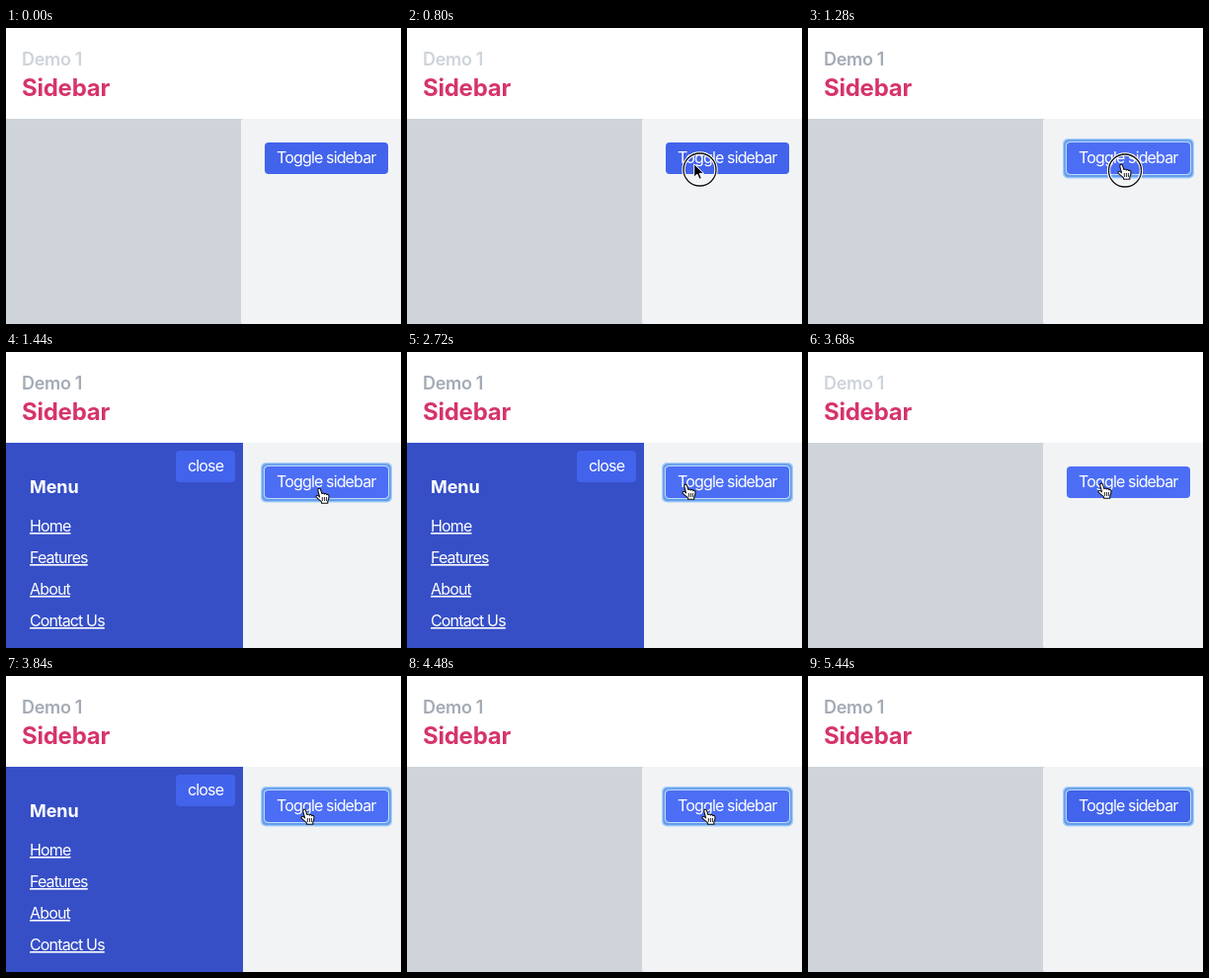
These frames come from a looping animation (400 by 300 pixels, 6080 ms). An HTML page:

```html
<!DOCTYPE html>
<html lang="en">
<head>
<meta charset="utf-8">
<title>Sidebar demo</title>
<style>
  html, body { margin: 0; width: 100%; height: 100%; overflow: hidden; background: #fff; }
  svg { display: block; width: 400px; height: 300px; }
  text { font-family: Inter, "Open Sans", sans-serif; font-size: 16px; letter-spacing: -.85px; fill: #fff; }
  .link { text-decoration: underline; }
  #eyebrow { font-size: 18px; font-weight: 600; letter-spacing: -.3px; }
  .title { font-size: 24px; font-weight: 700; letter-spacing: -.25px; fill: #d6336c; }
  .menu { font-size: 18px; font-weight: 700; letter-spacing: -.1px; }
</style>
</head>
<body>
<svg viewBox="0 0 400 300">
  <rect width="400" height="300" fill="#fff"/>
  <text id="eyebrow" x="16" y="38">Demo 1</text>
  <text class="title" x="16" y="69">Sidebar</text>

  <rect y="92" width="400" height="208" fill="#ced4da"/>
  <rect x="238" y="92" width="170" height="208" rx="2" fill="#f1f3f5"/>

  <g id="sidebar">
    <rect y="92" width="240" height="208" fill="#364fc7"/>
    <rect id="closeRing" x="168.5" y="96.5" width="67" height="39" rx="6" fill="#2a5fcb"/>
    <rect id="closeButton" x="172" y="100" width="60" height="32" rx="4"/>
    <text x="184" y="121">close</text>
    <text class="menu" x="24" y="143">Menu</text>
    <text class="link" x="24" y="182">Home</text>
    <text class="link" x="24" y="214">Features</text>
    <text class="link" x="24" y="246">About</text>
    <text class="link" x="24" y="278">Contact Us</text>
  </g>

  <g id="toggleRing">
    <rect x="258" y="112" width="133" height="40.5" rx="5" fill="#a9cdf5"/>
    <rect x="259.2" y="113.2" width="130.6" height="38" rx="4.5" fill="#629eee"/>
    <rect x="261" y="115" width="127" height="34" rx="4.5" fill="#c3d9f8"/>
  </g>
  <rect id="toggleButton" x="262" y="116" width="125" height="32" rx="4"/>
  <text x="274" y="137">Toggle sidebar</text>

  <g id="click" fill="none">
    <circle r="16.5" stroke="#fff" stroke-width="3.4"/>
    <circle r="16.5" stroke="#111" stroke-width="1.3"/>
  </g>
  <g id="arrow" stroke-linejoin="round">
    <path d="M.7 .8V14.2L3.9 11.2 6.1 16.3 8.4 15.3 6.2 10.4H10.6Z" fill="#000" stroke="#fff"/>
  </g>
  <g id="hand" stroke="#111" stroke-width="1.1" stroke-linejoin="round" stroke-linecap="round">
    <path fill="#fff" d="M4.6 9.8L2.9 3.6C2.4 1.2 4.7 .1 5.5 2.4L6.9 6.6C7.6 5.6 9 5.8 9.3 7C10.2 6.2 11.4 6.5 11.7 7.6C13 7 14 7.8 14 9.2C14 12 13.3 13 12.8 14V16.3H6.6V15C5.3 13.6 3.4 12.2 1.4 10.4C.2 9 2 7.8 3.2 8.6Z"/>
    <path fill="none" stroke-width=".9" d="M7.3 10.4V13.6M9.4 10.4V13.6M11.4 10.4V13.6"/>
  </g>
</svg>
<script>
  const LOOP = 6080;
  const BASE = '#4263eb', FADING = '#4869f0', HOVER = '#4c6ef5';
  const $ = id => document.getElementById(id);

  // Pointer stops: start time, shape, left, top
  const pointer = [
    [0, ''],
    [320, 'arrow', 355, 171],
    [480, 'arrow', 290, 145],
    [640, 'arrow', 290, 137],
    [1120, 'hand', 313, 137],
    [2720, 'hand', 278, 133],
    [2880, 'hand', 213, 122],
    [3040, 'hand', 201, 121],
    [3360, 'arrow', 205, 120],
    [3520, 'arrow', 255, 130],
    [3680, 'hand', 293, 132],
    [3840, 'hand', 298, 134],
    [5280, 'arrow', 350, 162],
    [5440, '']
  ];

  // Clicks: start, end, centre
  const clicks = [
    [800, 960, 296.5, 143.5],
    [1280, 1440, 321, 144.5],
    [3200, 3360, 208.5, 129]
  ];

  const within = (t, ...spans) => spans.some(([from, to]) => t >= from && t < to);
  const show = (id, on) => $(id).setAttribute('visibility', on ? 'visible' : 'hidden');
  const fill = (id, color) => $(id).setAttribute('fill', color);
  const move = (id, x, y) => $(id).setAttribute('transform', `translate(${x} ${y})`);

  function render(t) {
    const open = within(t, [1440, 3360], [3840, 4480]);
    $('sidebar').style.display = open ? '' : 'none';
    $('eyebrow').style.fill = within(t, [1280, 3360], [3840, LOOP]) ? '#a3abb5' : '#ced4da';

    const hovered = within(t, [1120, 2880], [3680, 5280]);
    fill('toggleButton', hovered ? HOVER : within(t, [5280, 5440]) ? FADING : BASE);
    show('toggleRing', within(t, [1280, 3200], [3840, LOOP]));

    fill('closeButton', within(t, [2880, 3360]) ? HOVER : BASE);
    $('closeRing').style.display = within(t, [3200, 3360]) ? '' : 'none';

    const [, shape, x, y] = pointer.filter(stop => stop[0] <= t).pop();
    for (const id of ['arrow', 'hand']) show(id, id === shape);
    if (shape) move(shape, x, y);

    const click = clicks.find(([from, to]) => within(t, [from, to]));
    show('click', click);
    if (click) move('click', click[2], click[3]);
  }

  const start = performance.now();
  function tick() {
    render((performance.now() - start) % LOOP);
    requestAnimationFrame(tick);
  }
  tick();
</script>
</body>
</html>
```
